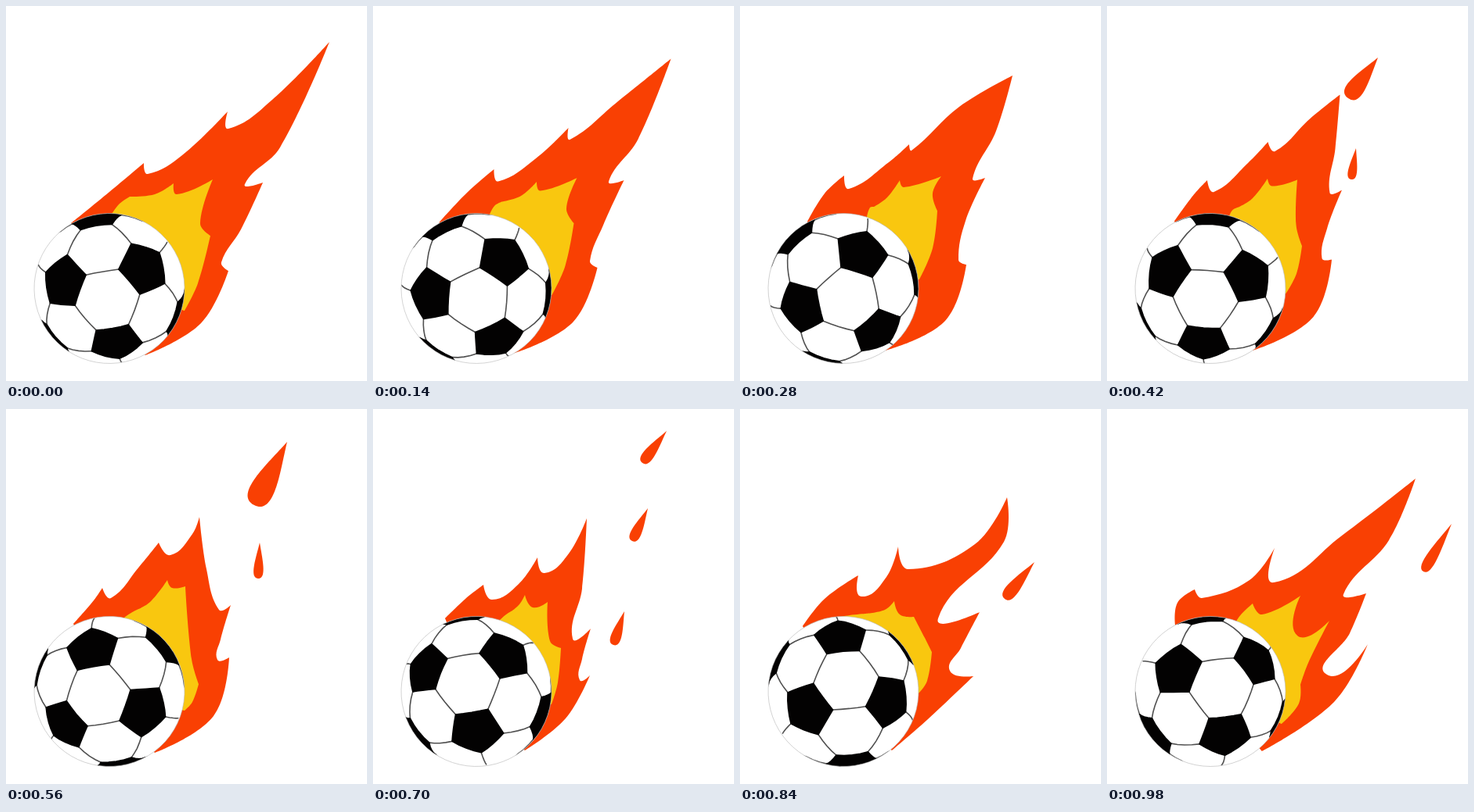
Animation of 461 by 480 pixels, one loop 1.12 s. Source, as an HTML page:

```html
<!DOCTYPE html>
<html lang="en">
<head>
<meta charset="utf-8">
<title>Flaming ball</title>
<style>
  html, body { margin: 0; width: 100%; height: 100%; overflow: hidden; background: #fff; }
  svg { display: block; width: 461px; height: 480px; }
  .pose { visibility: hidden; animation: show 1120ms step-end infinite; }
  @keyframes show {
    0% { visibility: visible; }
    12.5%, 100% { visibility: hidden; }
  }
  .fire { fill: #f94003; }
  .glow { fill: #f9c70f; }
  .patch { fill: #030202; stroke: #030202; stroke-width: 1.5; stroke-linejoin: round; }
  .seam { fill: none; stroke: #505050; stroke-width: 1.6; stroke-linecap: round; }
  .rim { fill: none; stroke: #bbb; stroke-width: .6; }
</style>
</head>
<body>
<svg id="stage" viewBox="0 0 461 480"></svg>
<script>
const CX = 132, CY = 361.5, R = 96, HOLD = 140;
const RAD = Math.PI / 180;

// --- Ball: a truncated icosahedron, seen slightly off the centre of a hexagon.
const TILT = 9 * RAD, EYE = 11, LENS = Math.sqrt(EYE * EYE - 1);

function onSphere(polar, azimuth) {
  const s = Math.sin(polar * RAD);
  const x = s * Math.cos(azimuth * RAD), y = s * Math.sin(azimuth * RAD), z = Math.cos(polar * RAD);
  const c = Math.cos(TILT), t = Math.sin(TILT);
  return [x * c + z * t, y, z * c - x * t];
}

const dot = (a, b) => a.reduce((sum, v, i) => sum + v * b[i], 0);
const mix = (a, b, t) => a.map((v, i) => v + (b[i] - v) * t);

// Points behind the horizon slide out to the rim.
function project(p) {
  const [x, y, z] = p.map(v => v / Math.hypot(...p));
  const k = z > 1 / EYE ? LENS / (EYE - z) : 1.03 / Math.hypot(x, y);
  return [x * k * R, y * k * R].map(v => v.toFixed(1)).join(' ');
}

const arc = (a, b) => [0, .25, .5, .75, 1].map(t => project(mix(a, b, t))).join('L');

function drawBall() {
  const nodes = [];
  for (const [polar, start] of [[37.38, -20], [79.19, 40], [100.81, -20], [142.62, 40]])
    for (let i = 0; i < 3; i++) nodes.push(onSphere(polar, start + i * 120));

  let seams = '', patches = '';
  for (const v of nodes) {
    const near = nodes.filter(w => w !== v && dot(v, w) > .4);
    const around = w => Math.atan2(w[1] - v[1] * .447, w[0] - v[0] * .447);
    near.sort((a, b) => around(a) - around(b));

    for (const w of near)
      if (v[2] + w[2] > 0) seams += 'M' + arc(mix(v, w, 1 / 3), mix(v, w, 2 / 3));

    if (v[2] > 0) {
      const corners = near.map(w => mix(v, w, 1 / 3));
      patches += 'M' + corners.map((c, i) => arc(c, corners[(i + 1) % 5])).join('L') + 'Z';
    }
  }
  return path('seam', seams) + path('patch', patches);
}

// --- Flames: the same key points in every pose, tips sharp, bays and flanks round.
const FIRE_TIPS = [0, 2, 5, 8, 11, 14, 16, 17];
const GLOW_TIPS = [0, 2, 4, 6, 8, 10, 11];

function points(text) {
  return [...text.split(' ').map(p => p.split(',').map(Number)), [CX, CY]];
}

function outline(pts, tips) {
  const n = pts.length, at = i => pts[(i + n) % n];
  const handle = (i, reach) => {
    const p = at(i), a = at(i - 1), b = at(i + 1);
    if (tips.includes(i % n)) return p;
    const k = reach * .38 / Math.hypot(b[0] - a[0], b[1] - a[1]);
    return [p[0] + (b[0] - a[0]) * k, p[1] + (b[1] - a[1]) * k];
  };
  return 'M' + pts[0] + pts.map((p, i) => {
    const q = at(i + 1), span = Math.hypot(q[0] - p[0], q[1] - p[1]);
    return `C${handle(i, span)} ${handle(i + 1, -span)} ${q}`;
  }).join('') + 'Z';
}

// A drop runs from its tip to a rounded base.
function drop([x, y, bx, by, width]) {
  const dx = bx - x, dy = by - y, k = width / Math.hypot(dx, dy);
  const side = (t, s) => [x + dx * t - dy * k * s, y + dy * t + dx * k * s];
  return `M${x},${y}C${side(.4, .3)} ${side(1, 1)} ${bx},${by}C${side(1, -1)} ${side(.4, -.3)} ${x},${y}Z`;
}

const pose = (turn, fire, glow, ...drops) => ({ turn, fire: points(fire), glow: points(glow), drops });

const between = (a, b, ...drops) => ({
  turn: (a.turn + b.turn) / 2,
  fire: a.fire.map((p, i) => mix(p, b.fire[i], .5)),
  glow: a.glow.map((p, i) => mix(p, b.glow[i], .5)),
  drops
});

const long = pose(100,
  '83,278 132,238 176,201 181,215 225,191 283,135 284,157 340,120 413,46 350,181 305,228 328,226 300,286 275,328 284,339 249,406 178,447',
  '134,268 144,254 158,244 190,241 214,227 218,241 264,222 248,278 261,294 245,355 228,390');
const wide = pose(68,
  '86,276 108,240 133,217 139,234 190,200 216,177 219,185 280,129 348,89 327,160 297,221 313,220 288,275 279,325 289,331 262,403 182,442',
  '162,270 166,258 171,257 188,245 204,223 209,232 257,218 246,240 252,262 246,310 229,350');
const torn = pose(160,
  '86,275 112,245 123,229 134,242 170,202 195,171 210,187 238,160 247,138 256,205 272,257 287,251 274,295 270,321 285,318 265,393 190,440',
  '150,268 155,264 165,258 184,247 206,219 212,229 229,227 237,320 246,352 238,375 228,386',
  [359, 42, 317, 123, 30], [324, 171, 322, 217, 12]);
const low = pose(221,
  '92,268 118,243 141,225 152,244 186,224 210,190 219,210 250,185 273,140 267,230 255,294 278,281 267,320 264,347 277,341 246,396 194,437',
  '162,270 170,263 178,258 187,250 194,238 204,254 223,247 226,297 240,306 236,350 228,378',
  [375, 28, 344, 69, 14], [351, 127, 331, 169, 13], [321, 259, 307, 302, 13]);
const curl = pose(284,
  '80,278 108,243 151,213 155,240 187,215 202,176 215,205 300,173 341,113 337,170 253,268 306,260 282,306 268,335 298,342 240,397 194,437',
  '123,267 140,264 160,262 185,257 197,246 204,263 222,266 236,293 245,311 239,348 228,364',
  [376, 196, 338, 243, 16]);
const surge = pose(343,
  '87,276 90,248 112,231 121,242 182,219 214,178 213,222 300,162 394,89 360,168 302,237 331,236 310,287 281,340 333,301 290,375 198,438',
  '166,270 172,262 186,249 198,263 247,239 243,290 284,271 257,325 247,353 245,377 223,403',
  [440, 147, 404, 208, 14]);

const poses = [
  long, between(long, wide),
  wide, between(wide, torn, [346, 66, 308, 118, 22], [318, 182, 312, 222, 11]),
  torn, low, curl, surge
];

// --- Stage
function path(cls, d) {
  return `<path class="${cls}" d="${d}"/>`;
}

function drawPose({ turn, fire, glow, drops }, i) {
  return `<g class="pose" style="animation-delay:${(i - poses.length) * HOLD}ms">
    ${path('fire', outline(fire, FIRE_TIPS) + drops.map(drop).join(''))}
    ${path('glow', outline(glow, GLOW_TIPS))}
    <use href="#ball" transform="translate(${CX} ${CY}) rotate(${turn})"/>
  </g>`;
}

document.getElementById('stage').innerHTML = `<defs>
  <clipPath id="round"><circle r="${R}"/></clipPath>
  <g id="ball">
    <circle r="${R}" fill="#fff"/>
    <g clip-path="url(#round)">${drawBall()}</g>
    <circle class="rim" r="${R}"/>
  </g>
</defs>` + poses.map(drawPose).join('');
</script>
</body>
</html>
```
